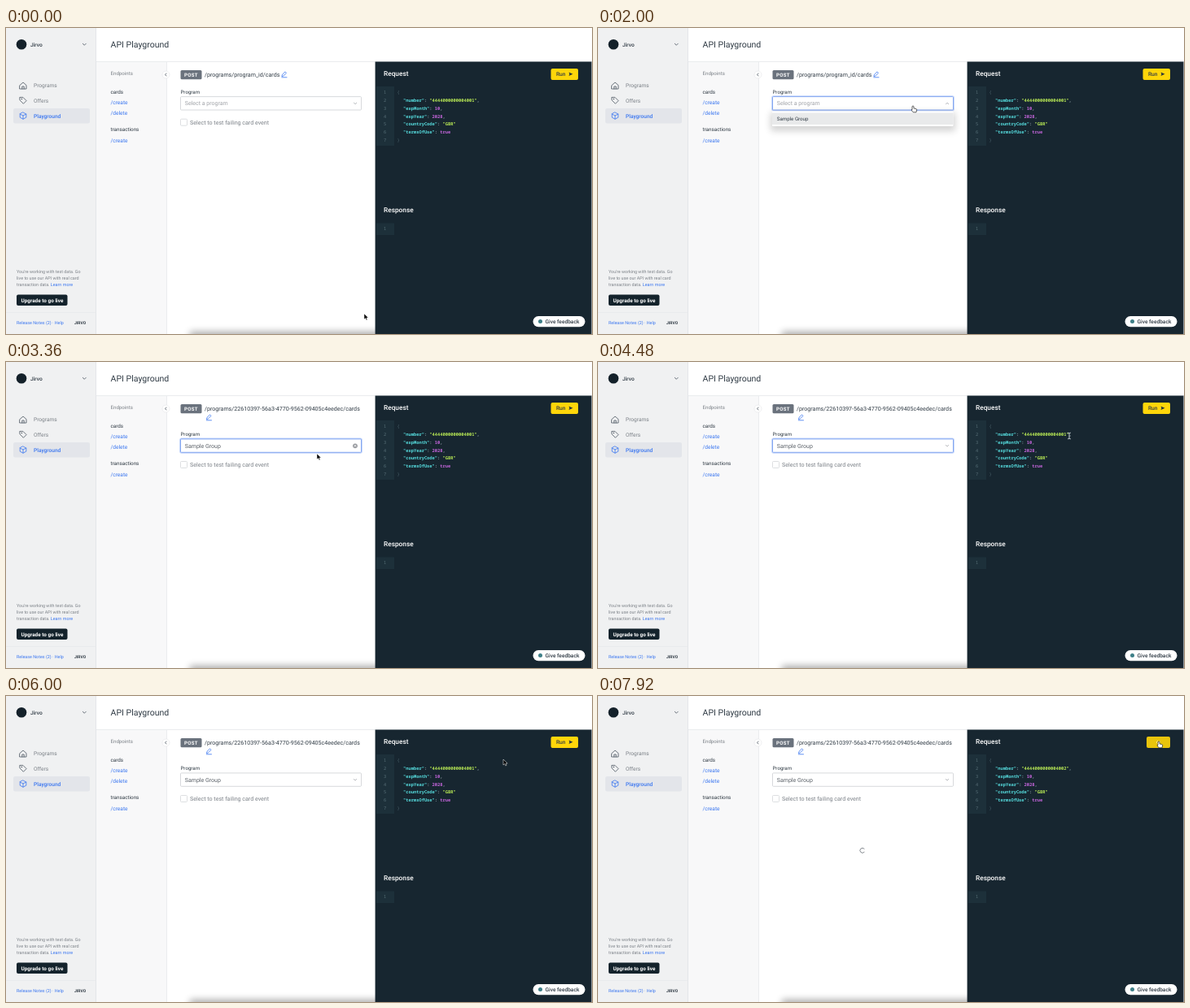
An HTML page for the animation above (8000 ms loop, 720 px wide and 377 px high).

```html
<!DOCTYPE html>
<html lang="en">
<head>
<meta charset="utf-8">
<title>API Playground</title>
<style>
html, body { margin: 0; width: 100%; height: 100%; overflow: hidden; background: #fff; }
svg { display: block; width: 720px; height: 377px; }
text { font: 6.6px Roboto, sans-serif; fill: #303b45; text-rendering: geometricPrecision; white-space: pre; }
.line { fill: none; stroke-width: .8; stroke-linecap: round; stroke-linejoin: round; }
.ink { stroke: #4b5560; }
.blue { fill: #3a76f0; }
.pen { stroke: #3a76f0; }
.grey { fill: #7b8087; }
.pale { fill: #9a9da3; }
.white { fill: #fff; }
.med { font-weight: 500; }
.bold { font-weight: 700; }
.xs { font-size: 5.4px; }
.sm { font-size: 6.15px; }
.md { font-size: 7.1px; }
.lg { font-size: 8.3px; }
.xl { font-size: 10.55px; }
.code text { font: 600 5.4px "Noto Sans Mono", monospace; fill: #8fa0a8; }
.code .num { fill: #587078; font-weight: 400; }
.code .brace { fill: #4c626c; font-weight: 400; }
.code .key { fill: #56dcde; }
.code .str { fill: #b9ea55; }
.code .val { fill: #c565dc; }
</style>
</head>
<body>
<svg viewBox="0 0 720 377">
  <defs>
    <filter id="blur" x="-20%" y="-150%" width="140%" height="400%"><feGaussianBlur stdDeviation="4.5"/></filter>
    <g id="pencil" class="line pen"><path d="M.5 5.7 1 3.8 4.5.4 6 1.9 2.5 5.3ZM.3 7.3H6.5"/></g>
  </defs>

  <!-- sidebar -->
  <path fill="#f0f1f2" d="M0 0H110V377H0Z"/>
  <path fill="#e4e6e9" d="M110 0h1V377h-1ZM111 41H720v.8H111ZM0 350H110v.6H0Z"/>
  <circle cx="19" cy="20.2" r="6.3" fill="#14212a"/>
  <text x="30" y="22.6" class="med">Jirvo</text>
  <path class="line ink" d="m94.3 19.2 2 2 2-2"/>
  <rect x="9" y="99" width="94" height="18.5" rx="2" fill="#e3e5ea"/>
  <g class="line ink">
    <path d="m17 70.5 4-3.5 4 3.5V75H17ZM19.8 75V72h2.4v3"/>
    <path d="M17.2 85.4h3.7l4.2 4.2-3.7 3.7-4.2-4.2Z"/>
    <circle cx="19.2" cy="87.4" r=".4"/>
    <path class="pen" d="m21 104 3.8 2v4.2l-3.8 2-3.8-2V106ZM17.2 106l3.8 2 3.8-2M21 108v4.2"/>
  </g>
  <text x="34" y="73.1" class="grey">Programs</text>
  <text x="34" y="92" class="grey">Offers</text>
  <text x="34" y="110.5" class="blue med">Playground</text>
  <text x="13" y="301.5" class="xs grey">You're working with test data. Go</text>
  <text x="13" y="309.5" class="xs grey">live to use our API with real card</text>
  <text x="13" y="317.5" class="xs grey">transaction data. <tspan class="blue">Learn more</tspan></text>
  <rect x="13" y="328.5" width="62.5" height="13.5" rx="2" fill="#14232c"/>
  <text x="18.5" y="337.6" class="white bold" style="font-size:6.4px">Upgrade to go live</text>
  <text x="13" y="365.3" class="xs blue">Release Notes (2) · Help</text>
  <text x="84" y="365.3" class="bold" style="font-size:5px">JIRVO</text>

  <!-- endpoints -->
  <text x="128.5" y="24" class="xl">API Playground</text>
  <path fill="#f8f8f9" d="M111 42h86V377h-86Z"/>
  <path fill="#e6e7ea" d="M197 42h.8V377h-.8Z"/>
  <text x="128.5" y="58.4" class="sm grey">Endpoints</text>
  <text x="128.5" y="80.5" style="font-size:6.3px">cards</text>
  <text x="128.5" y="94.3" class="blue">/create</text>
  <text x="128.5" y="107" class="blue">/delete</text>
  <text x="128.5" y="126.7" style="font-size:6.3px">transactions</text>
  <text x="128.5" y="140.5" class="blue">/create</text>
  <circle cx="196.5" cy="57.5" r="4.5" fill="#fff" stroke="#e4e5e8" stroke-width=".6"/>
  <path class="line ink" d="m197 56-1.4 1.5 1.4 1.5"/>

  <!-- form -->
  <rect x="226" y="374" width="240" height="12" fill="#000" opacity=".32" filter="url(#blur)"/>
  <rect x="214.5" y="52" width="26" height="11.3" rx="1.5" fill="#6a727d"/>
  <text x="219" y="60.2" class="white bold sm" letter-spacing=".25">POST</text>
  <text id="path" x="244" y="60" class="md"></text>
  <use id="edit" href="#pencil"/>
  <g id="form">
    <text x="214.5" y="81.2" class="sm">Program</text>
    <rect id="glow" x="213.7" y="83.8" width="223.6" height="18" rx="2" fill="none" stroke="#c3d5fb" stroke-width="1.2"/>
    <rect id="box" x="214.5" y="84.6" width="222" height="16.4" rx="1" fill="#fff" stroke-width=".8"/>
    <text id="choice" x="219.8" y="95.4" style="font-size:7px"></text>
    <path id="arrow" class="line" stroke="#a0a4aa"/>
    <g id="clear">
      <circle cx="429" cy="93" r="2.9" fill="#989ba0"/>
      <path class="line" stroke="#fff" d="m428 92 2 2m0-2-2 2"/>
    </g>
    <rect x="214.5" y="112.2" width="8" height="8" rx="1" fill="#fff" stroke="#d5d7da" stroke-width=".8"/>
    <text x="226" y="118.7" class="md grey">Select to test failing card event</text>
  </g>
  <g id="menu">
    <rect x="212" y="104" width="227" height="23" fill="#000" opacity=".17" filter="url(#blur)"/>
    <rect x="214" y="102.5" width="222.5" height="18.5" rx="1" fill="#fff"/>
    <rect x="214" y="104.5" width="222.5" height="14.5" fill="#e9eaeb"/>
    <text x="219.8" y="114" class="sm">Sample Group</text>
  </g>
  <path id="wait" class="line" stroke="#666c74" d="M2.1 2.1A3 3 0 1 1 2.1-2.1"/>

  <!-- code panel -->
  <path fill="#172630" d="M453.6 41.4H719.5V377H453.6Z"/>
  <path fill="#1d303a" d="M455 72h22v73h-22ZM455 240.5h22V255h-22Z"/>
  <text x="464" y="59.4" class="lg med white">Request</text>
  <text x="464" y="227.2" class="lg med white">Response</text>
  <g id="code" class="code"></g>
  <rect id="run" y="50" height="14" rx="2"/>
  <g id="runLabel">
    <text x="676" y="59.3" class="med">Run</text>
    <path fill="#26323c" d="m691.5 54.5 5 2.3-5 2.3.9-2.3Z"/>
  </g>
  <path id="runWait" class="line" stroke="#fff3b5" d="M2 0A2 2 0 1 1 0-2"/>
  <rect x="647.5" y="355" width="64" height="13.3" rx="6.6" fill="#fff"/>
  <circle cx="656.5" cy="361.6" r="2.5" fill="#3f8088"/>
  <text x="662.5" y="364" class="med" style="font-size:6.6px">Give feedback</text>

  <!-- pointers -->
  <g id="pointer" stroke-linejoin="round">
    <path id="tip" stroke="#fff" stroke-width=".5" d="M0 0V7l1.7-1.5 1.1 2.4 1.2-.5-1-2.4H5.2Z"/>
    <path id="hand" fill="#fff" stroke="#222" stroke-width=".7" d="M0 0Q1 0 1 1V3L4 3.6Q4.8 4 4.7 5L4 7.8H.2L-2 5Q-2 4-1 4.6V1Q-1 0 0 0Z"/>
    <path id="beam" fill="none" stroke="#dfe6e9" stroke-width=".9" d="M-1.8-3.8Q0-3.8 0-2.8 0-3.8 1.8-3.8M0-2.8V2.8M-1.8 3.8Q0 3.8 0 2.8 0 3.8 1.8 3.8"/>
  </g>
</svg>
<script>
const LOOP = 8000, STEP = 80;
const $ = id => document.getElementById(id);
const set = (id, attrs) => { for (const k in attrs) $(id).setAttribute(k, attrs[k]); };
const show = (id, on) => { $(id).style.display = on ? '' : 'none'; };
const ramp = (t, a, b) => Math.min(1, Math.max(0, (t - a) / (b - a)));

// request body
const lineY = i => 81.4 + i * 9.75;
const fields = [
  ['number', '', 'str', ','],
  ['expMonth', '10', 'val', ','],
  ['expYear', '2028', 'val', ','],
  ['countryCode', '"GBR"', 'str', ''],
  ['termsOfUse', 'true', 'val', '']
];
const label = (x, y, body, cls = '') => `<text x="${x}" y="${y}" class="${cls}">${body}</text>`;
$('code').innerHTML =
  [1, 2, 3, 4, 5, 6, 7].map(n => label(464, lineY(n - 1), n, 'num')).join('') +
  label(480.5, lineY(0), '{', 'brace') + label(480.5, lineY(6), '}', 'brace') + label(464, 249, 1, 'num') +
  fields.map(([key, value, cls, end], i) => label(488, lineY(i + 1),
    `<tspan class="key">"${key}"</tspan>: <tspan class="${cls}" id="${key}">${value}</tspan>${end}`)).join('');

// pointer route: time, x, y
const route = [
  [0, 440, 352], [80, 440, 352], [160, 403, 188], [240, 403, 188], [320, 392, 135], [400, 391, 121],
  [560, 391, 121], [1120, 389, 99], [1520, 389, 99], [1680, 387, 96], [2160, 387, 96],
  [2640, 385, 109], [3120, 385, 109], [3360, 382, 113], [4080, 598, 100], [4480, 579, 91],
  [5040, 579, 91], [5440, 611, 78], [6400, 611, 78], [7280, 689, 56], [8000, 689, 56]
];
function pointerAt(t) {
  const i = route.findIndex(p => p[0] > t);
  const [a, b] = [route[i - 1], route[i]];
  const u = ramp(t, a[0], b[0]), e = u * u * (3 - 2 * u);
  return [a[1] + (b[1] - a[1]) * e, a[2] + (b[2] - a[2]) * e];
}

function draw(t) {
  const within = (a, b) => t >= a && t < b;
  const picked = t >= 2880, focus = within(1840, 4640), busy = t >= 7520;

  $('path').textContent = `/programs/${picked ? '22610397-56a3-4770-9562-09405c4eedec' : 'program_id'}/cards`;
  set('edit', { transform: picked ? 'translate(246 64.5)' : 'translate(338.5 53.5)' });
  set('form', { transform: `translate(0 ${picked ? 10.3 : 0})` });
  $('choice').textContent = picked ? 'Sample Group' : 'Select a program';
  $('choice').style.fill = picked ? '#5a6067' : '#a0a3a8';

  const hover = within(1040, 1840);
  set('box', { stroke: focus ? '#6691ec' : hover ? '#8dabee' : '#cdd0d4' });
  set('glow', { opacity: focus ? ramp(t, 1760, 2000) : 0 });
  set('arrow', { d: within(1920, 2880) ? 'm427.5 93.7 1.6-1.5 1.6 1.5' : 'm427.5 92.2 1.6 1.5 1.6-1.5' });
  const clear = within(2880, 3440);
  show('clear', clear);
  show('arrow', !clear);
  set('menu', { opacity: ramp(t, 1760, 2000) * (1 - ramp(t, 2800, 3040)) });

  $('number').textContent = `"444400000000400${t < 6080 ? 1 : t < 6160 ? '' : 2}"`;

  show('wait', busy);
  show('runWait', busy);
  show('runLabel', !busy);
  set('wait', { transform: `translate(325 190.3) rotate(${(t - 7920) * .36})` });
  set('runWait', { transform: `translate(688.5 57) rotate(${t * .36})` });
  set('run', { x: busy ? 674 : 669.5, width: busy ? 29 : 33.5, fill: t >= 7120 ? '#e9c40c' : '#ffd60a' });

  const kind = within(960, 3280) || t >= 7120 ? 'hand' : within(3760, 5360) ? 'beam' : 'tip';
  for (const id of ['tip', 'hand', 'beam']) show(id, id === kind);
  set('pointer', { transform: `translate(${pointerAt(t)})` });
  show('pointer', !within(6080, 6480));
}

function tick() {
  draw(Math.floor(performance.now() % LOOP / STEP) * STEP);
  requestAnimationFrame(tick);
}
tick();
</script>
</body>
</html>
```
